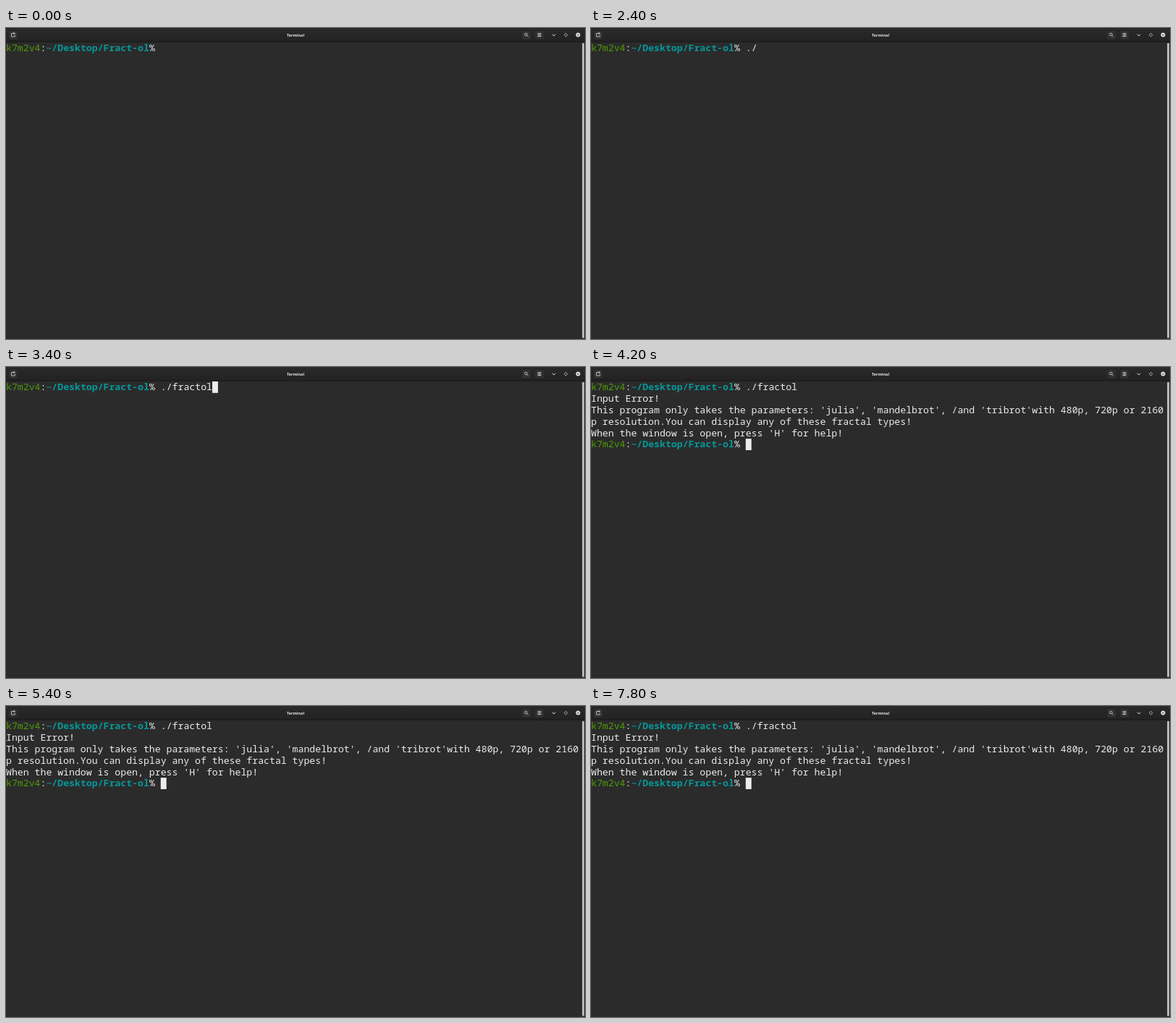
An HTML page with a canvas for the animation above (8 s loop, 800x430 px).

```html
<!DOCTYPE html>
<html lang="en">
<head>
<meta charset="utf-8">
<title>Terminal</title>
<style>
  html, body { margin: 0; width: 100%; height: 100%; overflow: hidden; background: #2b2b2b; }
  canvas { display: block; width: 800px; height: 430px; }
</style>
</head>
<body>
<canvas id="stage" width="800" height="430"></canvas>
<script>
const ctx = document.getElementById('stage').getContext('2d');

const LOOP = 8000;
const CELL = 19 / 2.4, ROW = 38 / 2.4, TOP = 20, BASE = 12.3;
const FONT = '13.195px "Noto Sans Mono", "DejaVu Sans Mono", monospace';
const WHITE = '#ececec', GREEN = '#4e9a06', TEAL = '#06989a';

const USER = 'k7m2v4', PATH = '~/Desktop/Fract-ol';
const PROMPT_LEN = USER.length + PATH.length + 3;
const COMMAND = './fractol';
const OUTPUT = [
  'Input Error!',
  "This program only takes the parameters: 'julia', 'mandelbrot', /and 'tribrot'with 480p, 720p or 2160",
  'p resolution.You can display any of these fractal types!',
  "When the window is open, press 'H' for help!"
];
const RUN_AT = 4200;

// [time, typed characters]
const TYPING = [[1800, 2], [2600, 3], [2800, 5], [3000, 6], [3200, 7], [3400, 9]];
// The cursor starts hidden and flips at each of these times.
const BLINKS = [400, 1000, 1600, 2400, 2600, 4600, 5400, 6000, 6600, 7200, 7800];

function write(text, col, row, color = WHITE, weight = '') {
  ctx.font = weight + ' ' + FONT;
  ctx.fillStyle = color;
  ctx.fillText(text, col * CELL, TOP + row * ROW + BASE);
}

function prompt(row) {
  const pathCol = USER.length + 1;
  write(USER, 0, row, GREEN);
  write(':', USER.length, row);
  write(PATH, pathCol, row, TEAL, 'bold');
  write('%', pathCol + PATH.length, row);
}

function cursor(col, row) {
  ctx.fillStyle = WHITE;
  ctx.fillRect(col * CELL, TOP + row * ROW, CELL, ROW);
}

function box(x, y, w, h, r, fill) {
  ctx.beginPath();
  ctx.roundRect(x, y, w, h, r);
  ctx.fillStyle = fill;
  ctx.fill();
}

function line(points, close) {
  ctx.beginPath();
  points.forEach(([x, y]) => ctx.lineTo(x, y));
  if (close) ctx.closePath();
  ctx.stroke();
}

function button(x) {
  box(x - 7, 2.8, 14, 13.6, 2.2, '#1b1b1b');
  box(x - 6.5, 3.3, 13, 12.6, 2, '#303030');
}

function header() {
  const shade = ctx.createLinearGradient(0, 0, 0, 19);
  shade.addColorStop(0, '#2a2a2a');
  shade.addColorStop(1, '#222222');
  ctx.fillStyle = shade;
  ctx.fillRect(0, 0, 800, 19);
  ctx.fillStyle = '#181818';
  ctx.fillRect(0, 18.6, 800, 1);

  ctx.font = 'bold 5.5px "Open Sans", "Noto Sans", sans-serif';
  ctx.fillStyle = '#e6e6e6';
  ctx.textAlign = 'center';
  ctx.fillText('Terminal', 400, 11.5);
  ctx.textAlign = 'left';

  [10, 719, 737].forEach(button);
  ctx.strokeStyle = '#dcdcdc';
  ctx.lineWidth = 0.8;

  // New tab
  line([[9.4, 7.4], [7.5, 7.4], [7.5, 12], [12.3, 12], [12.3, 9.6]]);
  line([[9, 7.4], [13, 7.4]]);
  line([[11, 5.8], [11, 9.2]]);

  // Search
  ctx.beginPath();
  ctx.arc(718.4, 8.9, 1.8, 0, Math.PI * 2);
  ctx.stroke();
  line([[719.7, 10.2], [721.7, 12.2]]);

  // Menu
  ctx.lineWidth = 1;
  [7.6, 9.6, 11.6].forEach(y => line([[734.5, y], [739.5, y]]));

  // Window controls
  line([[754.6, 8.6], [757, 10.9], [759.4, 8.6]]);
  ctx.lineWidth = 0.8;
  line([[773.5, 7.3], [775.8, 9.6], [773.5, 11.9], [771.2, 9.6]], true);
  ctx.beginPath();
  ctx.arc(790.4, 9.6, 3, 0, Math.PI * 2);
  ctx.fillStyle = '#e8e8e8';
  ctx.fill();
  ctx.strokeStyle = '#222222';
  line([[789.2, 8.4], [791.6, 10.8]]);
  line([[791.6, 8.4], [789.2, 10.8]]);
}

function draw(t) {
  ctx.fillStyle = '#2b2b2b';
  ctx.fillRect(0, 0, 800, 430);
  header();
  box(796.2, 20.8, 2.6, 408, 1.3, '#cacaca');

  const typed = TYPING.reduce((n, [at, count]) => t >= at ? count : n, 0);
  const ran = t >= RUN_AT;
  prompt(0);
  write(COMMAND.slice(0, typed), PROMPT_LEN, 0);
  if (ran) {
    OUTPUT.forEach((text, i) => write(text, 0, i + 1));
    prompt(OUTPUT.length + 1);
  }
  if (BLINKS.filter(at => t >= at).length % 2) {
    if (ran) cursor(PROMPT_LEN, OUTPUT.length + 1);
    else cursor(PROMPT_LEN + typed, 0);
  }
}

const start = performance.now();
function tick() {
  draw((performance.now() - start) % LOOP);
  requestAnimationFrame(tick);
}
tick();
</script>
</body>
</html>
```
